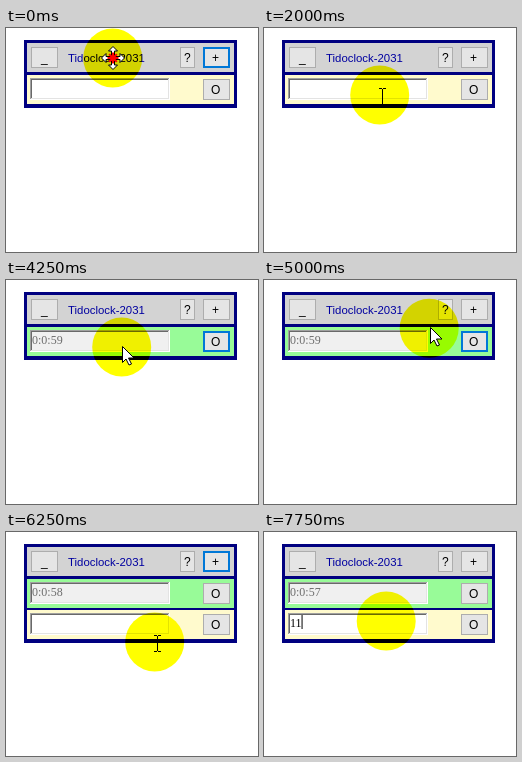
Recreate the animation shown at these times as an HTML page with a canvas. Size 252 px wide and 224 px high, loop 8 s.

```html
<!DOCTYPE html>
<html lang="en">
<head>
<meta charset="utf-8">
<title>Countdown window</title>
<style>
  html, body { margin: 0; width: 100%; height: 100%; overflow: hidden; background: #fff; }
  canvas { display: block; }
</style>
</head>
<body>
<canvas id="stage" width="252" height="224"></canvas>
<script>
const ctx = document.getElementById('stage').getContext('2d');
const LOOP = 8000, STEP = 250, SECOND = 1500;
const NAVY = '#000080', BLUE = '#0078d7';
const LEFT = 18, WIDTH = 213, ROW_TOP = 47, ROW_PITCH = 31;

// Moments of the story in ms
const HOVER_START = 1000, CLICK_FIELD = 1750, TYPE_MINUTE = 2500, TAB_TO_START = 3250,
      RUN = 4000, CLICK_PLUS = 5500, ADD_ROW = 5750, ENTER_NEW_FIELD = 6250,
      CLICK_NEW_FIELD = 7000, TYPE_NEW = 7250;

// The pointer rests at or passes these places
const stops = [
  { at: 0, x: 107, y: 30 },
  { at: 750, x: 224, y: 90 },
  { at: HOVER_START, x: 209, y: 72 },
  { at: 2000, x: 116, y: 67 },
  { at: 4500, x: 116, y: 67 },
  { at: CLICK_PLUS, x: 215, y: 29.5 },
  { at: ENTER_NEW_FIELD, x: 149, y: 110 },
  { at: 6750, x: 122.5, y: 89 }
];

const within = (t, from, to) => t >= from && t < to;
const ease = k => k * k * (3 - 2 * k);

function pointerAt(t) {
  const next = stops.findIndex(s => s.at > t);
  if (next < 0) return stops[stops.length - 1];
  const a = stops[next - 1], b = stops[next];
  const k = ease((t - a.at) / (b.at - a.at));
  return { x: a.x + (b.x - a.x) * k, y: a.y + (b.y - a.y) * k };
}

function rect(x, y, w, h, color) {
  ctx.fillStyle = color;
  ctx.fillRect(x, y, w, h);
}

function text(str, x, y, color, font) {
  ctx.fillStyle = color;
  ctx.font = font;
  ctx.fillText(str, x, y);
}

function button(label, x, y, w, state) {
  const h = 21, border = state === 'focus' ? 2 : 1;
  rect(x, y, w, h, state ? BLUE : '#adadad');
  rect(x + border, y + border, w - 2 * border, h - 2 * border, state === 'hover' ? '#e5f1fb' : '#e5e5e5');
  ctx.font = '12px "Liberation Sans", sans-serif';
  const labelX = Math.floor(x + (w - ctx.measureText(label).width) / 2);
  text(label, labelX, y + 14.5, '#000', ctx.font);
}

function field(y, value, disabled, caret) {
  const x = 24, w = 140, h = 22;
  const bevel = ['#fff', '#a0a0a0', '#e3e3e3', '#696969', disabled ? '#f0f0f0' : '#fff'];
  bevel.forEach((color, i) => {
    const topLeft = Math.floor(i / 2), inset = i;
    rect(x + topLeft, y + topLeft, w - topLeft - Math.ceil(inset / 2), h - topLeft - Math.ceil(inset / 2), color);
  });
  text(value, x + 2, y + 13.5, disabled ? '#6d6d6d' : '#000', '12px "Liberation Serif", serif');
  if (caret) rect(x + 2 + ctx.measureText(value).width, y + 2, 1, 14, '#000');
}

function row(index, running, value, buttonState, caret) {
  const y = ROW_TOP + index * ROW_PITCH;
  rect(LEFT + 3, y, WIDTH - 6, 29, running ? '#98fb98' : '#fffacd');
  field(y + 3, value, running, caret);
  button('O', 197, y + 4, 27, buttonState);
}

function shape(points) {
  ctx.beginPath();
  points.forEach(([x, y]) => ctx.lineTo(x, y));
  ctx.closePath();
  ctx.fillStyle = '#fff';
  ctx.strokeStyle = '#000';
  ctx.lineWidth = 1;
  ctx.fill();
  ctx.stroke();
}

// Pointer shapes are drawn around the hot spot at 0, 0
function arrow() {
  shape([[0.5, -0.5], [0.5, 15.5], [4, 12], [7, 18], [9.5, 17], [6.5, 11], [12, 11]]);
}

function beam() {
  rect(2, -6, 1, 15, '#000');
  for (const y of [-7, 9]) {
    rect(-1, y, 3, 1, '#000');
    rect(3, y, 3, 1, '#000');
  }
}

function moveCross() {
  const arm = [[-1.5, -1.5], [-1.5, -7], [-4.5, -7], [0, -11.5], [4.5, -7], [1.5, -7]];
  const turn = ([x, y], quarters) => quarters ? turn([-y, x], quarters - 1) : [x, y];
  shape([0, 1, 2, 3].flatMap(q => arm.map(p => turn(p, q))));
}

function burst(radius) {
  ctx.beginPath();
  for (let i = 0; i < 8; i++) {
    const a = i * Math.PI / 4;
    ctx.moveTo(0, 0);
    ctx.lineTo(radius * Math.cos(a), radius * Math.sin(a));
  }
  ctx.strokeStyle = '#f00';
  ctx.lineWidth = 2;
  ctx.stroke();
}

function halo() {
  ctx.globalCompositeOperation = 'multiply';
  ctx.beginPath();
  ctx.arc(-0.3, 0, 29.5, 0, 2 * Math.PI);
  ctx.fillStyle = '#ff0';
  ctx.fill();
  ctx.globalCompositeOperation = 'source-over';
}

function drawWindow(t) {
  const running = t >= RUN, added = t >= ADD_ROW;
  const plusFocused = t < CLICK_FIELD || within(t, ADD_ROW, CLICK_NEW_FIELD);
  const startFocused = within(t, TAB_TO_START, ADD_ROW);

  rect(LEFT, 12, WIDTH, 68 + (added ? ROW_PITCH : 0), NAVY);
  rect(LEFT + 3, 15, WIDTH - 6, 29, '#d3d3d3');
  button('_', 25, 19, 27);
  button('?', 174, 19, 15);
  button('+', 197, 19, 27, plusFocused ? 'focus' : within(t, CLICK_PLUS, ADD_ROW) && 'hover');
  text('Tidoclock-2031', 62, 34, '#0000a0', '11.4px "Liberation Sans", sans-serif');

  const secondsLeft = 59 - Math.max(0, Math.floor((t - RUN - STEP) / SECOND));
  const value = running ? '0:0:' + secondsLeft : t >= TYPE_MINUTE ? '1' : '';
  const startState = startFocused ? 'focus' : within(t, HOVER_START, HOVER_START + STEP) && 'hover';
  row(0, running, value, startState, within(t, TYPE_MINUTE, TYPE_MINUTE + 2 * STEP));

  if (added) {
    const typed = Math.max(0, Math.min(2, (t - TYPE_NEW) / STEP + 1));
    row(1, false, '1'.repeat(typed), '', typed > 0);
  }
}

function drawPointer(t) {
  const { x, y } = pointerAt(t);
  const typing = within(t, TYPE_MINUTE, RUN) || t >= TYPE_NEW;
  const overText = within(t, HOVER_START, TYPE_MINUTE) || t >= ENTER_NEW_FIELD;
  ctx.save();
  ctx.translate(x, y);
  halo();
  ctx.translate(Math.round(x) - x, Math.round(y) - y);
  if (t === 0) {
    moveCross();
    burst(5.5);
  } else if (!typing) {
    if (t === CLICK_PLUS) burst(7);
    overText ? beam() : arrow();
  }
  ctx.restore();
}

const start = performance.now();
function tick() {
  const elapsed = (performance.now() - start) % LOOP;
  const t = Math.floor(elapsed / STEP) * STEP;
  rect(0, 0, 252, 224, '#fff');
  drawWindow(t);
  drawPointer(t);
  requestAnimationFrame(tick);
}
tick();
</script>
</body>
</html>
```
